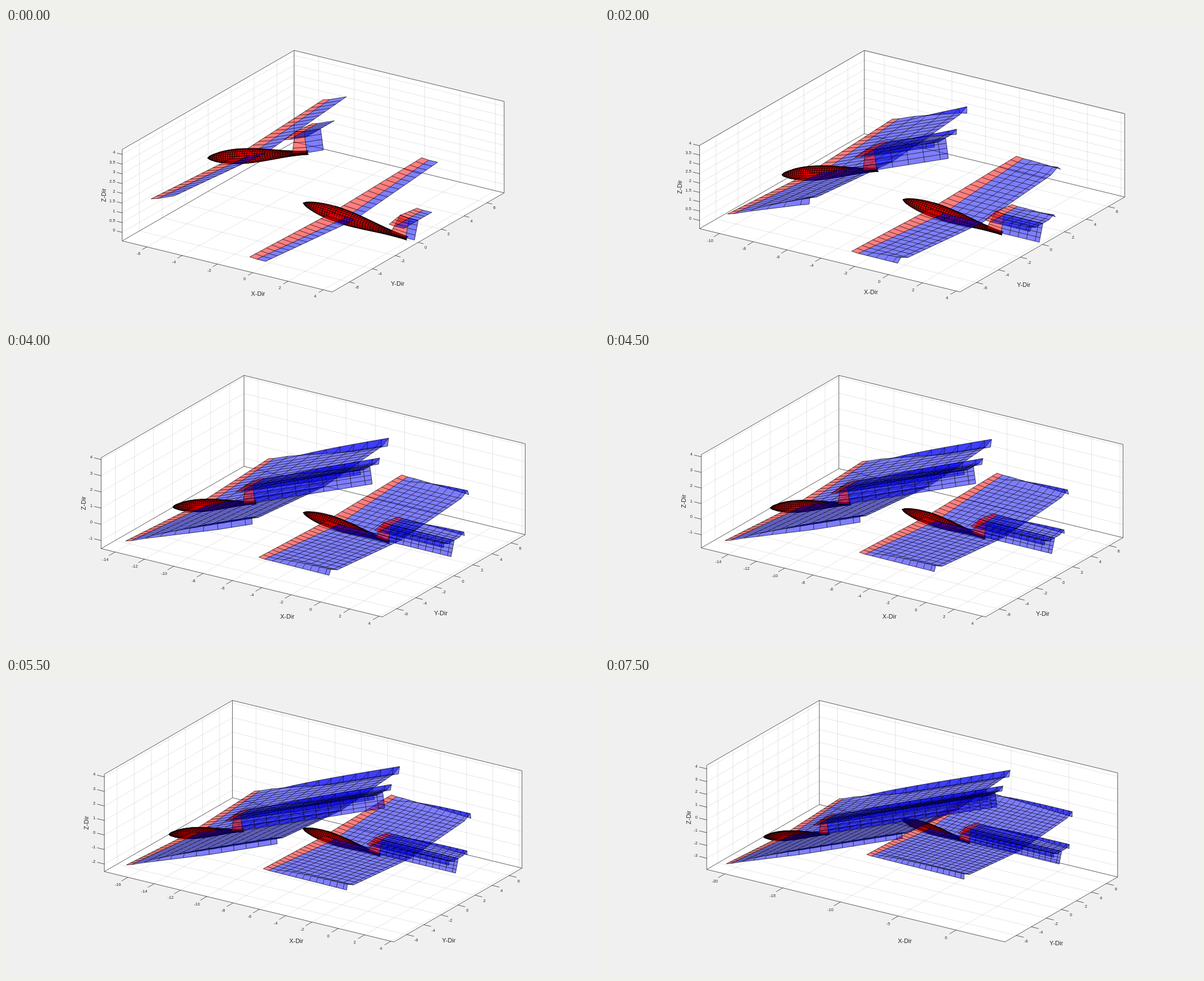
Animation, 1057 px wide and 530 px high, one loop 8000 ms. Source, as an HTML page with a canvas:

```html
<!DOCTYPE html>
<html lang="en">
<head>
<meta charset="utf-8">
<title>Glider wakes</title>
<style>
  html, body { margin: 0; width: 100%; height: 100%; overflow: hidden; background: #f0f0f0; }
  canvas { display: block; width: 1057px; height: 530px; }
</style>
</head>
<body>
<canvas id="stage" width="1057" height="530"></canvas>
<script>
const ctx = document.getElementById('stage').getContext('2d');
const rad = Math.PI / 180;
const STEP_MS = 500, STEPS = 16, INK = '#262626';
const cosA = Math.cos(33 * rad), sinA = Math.sin(33 * rad);
const cosE = Math.cos(22 * rad), sinE = Math.sin(22 * rad);
const RED = 'rgba(255,0,0,.5)', BLUE = 'rgba(0,0,255,.5)';

// The level glider is painted first: the other one's wake passes in front of its far wing.
const gliders = [
  { x: 0, z: -0.03, vx: -0.504, vz: 0, pitch: -5 * rad, roll: 1 },
  { x: -5.48, z: 1.79, vx: -0.94, vz: -0.342, pitch: 15 * rad, roll: 4 }
];

// Stations of a lifting surface from root to tip: [leading x, trailing x, y, z]
const stations = (count, at) => Array.from({ length: count + 1 }, (_, i) => at(i / count));
const wing = side => stations(15, t => [-0.4 + 0.2 * t, 0.4 - 0.2 * t, side * 7.5 * t, 0.35 * t]);
const tail = side => stations(4, t => [3.4 + 0.17 * t, 3.9, side * 1.22 * t, 1.06]);
const fin = stations(4, t => [2.95 + 0.45 * t, 3.8 + 0.12 * t, 0, 1.06 * t]);

let view;

function setView(n) {
  const x0 = -7.4 - 0.945 * n, x1 = n ? 4.22 : 4.5;
  const z0 = Math.min(-0.44, 1.22 - 0.34 * n);
  const z1 = n < 2 ? 4.25 - 0.13 * n : 3.93 + 0.023 * n;
  const lx = x1 - x0, lz = z1 - z0;
  const k = 431 / (lx * sinA * sinE + 15 * cosA * sinE + lz * cosE);
  view = { x0, x1, z0, z1, lx, lz, k, xc: (x0 + x1) / 2, zc: (z0 + z1) / 2 };
}

function project([x, y, z]) {
  const dx = x - view.xc, dz = z - view.zc;
  return [
    547.5 + view.k * (cosA * dx + sinA * y),
    255.5 + view.k * (sinA * sinE * dx - cosA * sinE * y - cosE * dz)
  ];
}

function addPath(points) {
  points.forEach(([x, y], i) => i ? ctx.lineTo(x, y) : ctx.moveTo(x, y));
}

function fillShape(points, color) {
  ctx.beginPath();
  addPath(points);
  ctx.fillStyle = color;
  ctx.fill();
}

// One stroke for all paths, so shared and crossing lines keep their weight.
function strokePaths(paths, color, width) {
  ctx.beginPath();
  paths.forEach(addPath);
  ctx.strokeStyle = color;
  ctx.lineWidth = width;
  ctx.stroke();
}

function toWorld(g, [x, y, z], step) {
  const c = Math.cos(g.pitch), s = Math.sin(g.pitch);
  return [g.x + x * c - z * s + g.vx * step, y, g.z + x * s + z * c + g.vz * step];
}

function ticks(from, to, step) {
  const list = [];
  for (let i = Math.ceil(from / step); i * step <= to; i++) list.push(i * step);
  return list;
}

function label(text, x, y, align = 'center') {
  ctx.textAlign = align;
  ctx.fillText(text, x, y);
}

function drawAxes() {
  const { x0, x1, z0, z1, lx, lz, k } = view, y0 = -7.5, y1 = 7.5;
  const xs = ticks(x0, x1, lx > 22.5 ? 5 : 2);
  const ys = ticks(y0, y1, 2);
  const zStep = lz > 5 ? 1 : 0.5;
  const zs = ticks(z0, z1, zStep);
  const path = (...pts) => pts.map(project);
  const floor = path([x0, y0, z0], [x1, y0, z0], [x1, y1, z0], [x0, y1, z0], [x0, y0, z0]);
  const top = path([x0, y0, z0], [x0, y0, z1], [x0, y1, z1], [x1, y1, z1], [x1, y1, z0]);
  const post = path([x0, y1, z0], [x0, y1, z1]);

  fillShape([...top, floor[1]], '#fff');
  strokePaths([
    ...xs.map(x => path([x, y0, z0], [x, y1, z0], [x, y1, z1])),
    ...ys.map(y => path([x1, y, z0], [x0, y, z0], [x0, y, z1])),
    ...zs.map(z => path([x0, y0, z], [x0, y1, z], [x1, y1, z]))
  ], 'rgba(38,38,38,.15)', 0.8);
  strokePaths([floor, top, post], INK, 0.75);

  const len = 0.025 * k * Math.max(lx * Math.hypot(cosA, sinA * sinE), 15 * Math.hypot(sinA, cosA * sinE));
  const marks = [];
  ctx.fillStyle = INK;
  ctx.textBaseline = 'middle';
  ctx.font = '7.5px "Liberation Sans", Arial, sans-serif';
  function mark(value, at, [ux, uy], [ox, oy], align) {
    const [px, py] = project(at);
    const end = [px + ux * len, py + uy * len];
    marks.push([[px, py], end]);
    label(value, end[0] + ox, end[1] + oy, align);
  }
  for (const x of xs) mark(x, [x, y0, z0], [-0.867, 0.5], [-6.3, 7]);
  for (const y of ys) mark(y, [x1, y, z0], [0.97, 0.24], [4, 7]);
  for (const z of zs) mark(z, [x0, y0, z], [-0.97, -0.24], [-3, -1], 'right');
  strokePaths(marks, INK, 0.75);

  ctx.font = '11px "Liberation Sans", Arial, sans-serif';
  const [mx, my] = project([view.xc, y0, z0]);
  label('X-Dir', mx + 55.5 + 8 * (len - 9.7), my + 50 + 3.4 * (len - 9.7));
  const [nx, ny] = project([x1, 0, z0]);
  label('Y-Dir', nx - 9 - 2.14 * (k - 24.6), ny + 60.5 + 1.05 * (k - 24.6));
  const [zx, zy] = project([x0, y0, view.zc]);
  ctx.save();
  ctx.translate(zx - len - (zStep < 1 ? 22.5 : 18), zy);
  ctx.rotate(-Math.PI / 2);
  label('Z-Dir', 0, 0);
  ctx.restore();
}

// At the wake's edge the tip node sinks inward under its neighbour, which rises outward.
function curl([x, y, z], fromTip, age, roll, size) {
  const out = Math.sign(y);
  if (!out || fromTip > 1 || age <= 0) return [x, y, z];
  if (fromTip === 1) {
    const rise = size * 0.25 * (1 - Math.exp(-age / 3));
    return [x, y + out * rise * 0.8, z + rise];
  }
  const sink = size * Math.min(0.4, 0.02 * age * roll);
  return [x, y - out * sink, z - sink * 0.65];
}

function drawSurface(g, parts, n, size) {
  const rows = [];
  const last = parts.length - 1;
  for (let r = 0; r <= n + 2; r++) {
    const age = Math.max(0, r - 1);
    const step = Math.max(n - age, n ? -0.5 : -1);
    rows.push(parts.map(([lead, trail, y, z], i) => {
      const p = toWorld(g, [r ? trail : lead, y, z], step);
      return project(curl(p, last - i, age - 1, g.roll, size));
    }));
  }
  for (let r = 0; r < rows.length - 1; r++) {
    for (let i = 0; i < last; i++) {
      fillShape([rows[r][i], rows[r][i + 1], rows[r + 1][i + 1], rows[r + 1][i]], r ? BLUE : RED);
    }
  }
  const columns = parts.map((_, i) => rows.map(row => row[i]));
  strokePaths([...rows, ...columns], '#000', 0.7);
}

function bodyRadius(u) {
  return u < 0.33
    ? 0.36 * Math.sin(Math.PI / 2 * u / 0.33) ** 0.62
    : 0.225 + 0.135 * Math.cos(Math.PI * (u - 0.33) / 0.67);
}

function drawBody(g, n) {
  const rings = 42, sides = 20, edges = [];
  const at = (i, j) => {
    const u = i / rings, a = j / sides * 2 * Math.PI, r = bodyRadius(u);
    return project(toWorld(g, [-2.02 + 5.93 * u, r * Math.cos(a), r * Math.sin(a)], n));
  };
  for (let i = 0; i < rings; i++) {
    for (let j = 0; j < sides; j++) {
      const q = [at(i, j), at(i + 1, j), at(i + 1, j + 1), at(i, j + 1)];
      const [a, b, c, d] = q;
      const turn = (c[0] - a[0]) * (d[1] - b[1]) - (c[1] - a[1]) * (d[0] - b[0]);
      if (turn > 0) {
        fillShape(q, '#f00');
        edges.push([...q, a]);
      }
    }
  }
  strokePaths(edges, '#000', 0.7);
}

function drawGlider(g, n) {
  drawSurface(g, wing(1), n, 1);
  drawBody(g, n);
  drawSurface(g, wing(-1), n, 1);
  drawSurface(g, tail(1), n, 0.7);
  drawSurface(g, fin, n, 0);
  drawSurface(g, tail(-1), n, 0.7);
}

function draw(n) {
  setView(n);
  ctx.fillStyle = '#f0f0f0';
  ctx.fillRect(0, 0, 1057, 530);
  ctx.lineJoin = 'round';
  drawAxes();
  for (const g of gliders) drawGlider(g, n);
}

let shown = -1;
function tick(now) {
  const n = Math.floor(now / STEP_MS) % STEPS;
  if (n !== shown) draw(shown = n);
  requestAnimationFrame(tick);
}
draw(shown = 0);
requestAnimationFrame(tick);
</script>
</body>
</html>
```
